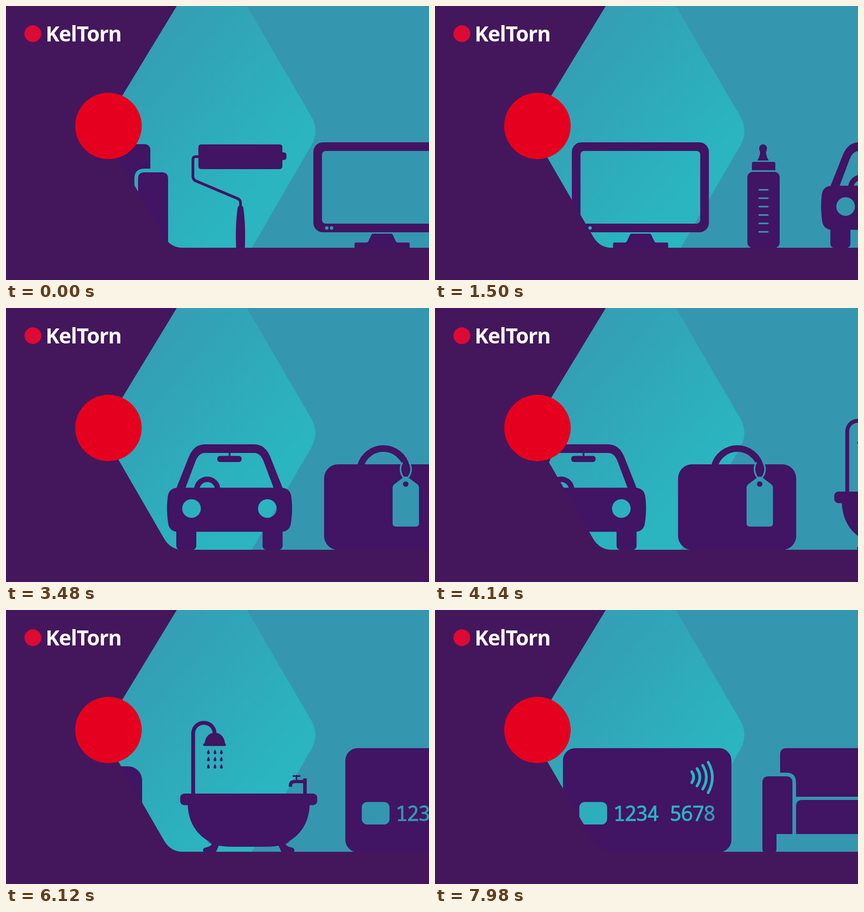
Write an HTML page that moves like this. It is 929x603 px and loops after 8000 ms.

```html
<!DOCTYPE html>
<html lang="en">
<head>
<meta charset="utf-8">
<title>KelTorn</title>
<style>
  html, body { margin: 0; width: 100%; height: 100%; overflow: hidden; background: #44175c; }
  svg { display: block; width: 929px; height: 603px; }
  #shapes { fill: #fff; }
  .cut { fill: #000; }
  .rod { fill: none; stroke: #fff; }
  .slit { fill: none; stroke: #000; stroke-linecap: round; }
  .digits { font: 400 45px "Noto Sans Mono", monospace; letter-spacing: -2.2px; white-space: pre; stroke: #000; stroke-width: 0.9px; stroke-linejoin: round; }
  .brand { font: 700 46px "Open Sans", sans-serif; letter-spacing: -1.2px; fill: #fff; }
</style>
</head>
<body>
<svg viewBox="0 0 929 603">
  <defs>
    <linearGradient id="glow" gradientUnits="userSpaceOnUse" x1="330" y1="90" x2="610" y2="330">
      <stop offset="0" stop-color="#349fb5"/>
      <stop offset="1" stop-color="#2ab5c0"/>
    </linearGradient>

    <path id="drop" d="M0 -5.5C1 -3 3 -1 3 2A3 3 0 0 1 -3 2C-3 -1 -1 -3 0 -5.5Z"/>
    <g id="drops">
      <use href="#drop" x="444.5"/><use href="#drop" x="459"/><use href="#drop" x="473"/>
    </g>
    <path id="foot" d="M441 509L468 517Q464 526 461 533H434Q430 526 437 523Q449 521 452 515Z"/>

    <g id="sofaHalf">
      <path d="M39 411V318Q39 304 53 304H250V411Z"/>
      <path d="M74 493V432Q74 418 88 418H250V493Z"/>
      <path class="cut" d="M0 358H52Q74 358 74 380V538H0Z"/>
      <path d="M0 380Q0 366 14 366H52Q66 366 66 380V493H31V526Q31 534 23 534H8Q0 534 0 526Z"/>
    </g>

    <mask id="shapes" maskUnits="userSpaceOnUse" x="-100" y="0" width="3100" height="603">
      <use href="#sofaHalf" transform="translate(356) scale(-1 1)"/>

      <g id="roller">
        <rect x="422.5" y="304.5" width="184.5" height="54.5" rx="6"/>
        <rect x="600" y="322" width="16" height="17" rx="6"/>
        <path class="rod" stroke-width="6" d="M424 331.5H417Q410.500 331.500 410.500 338V375Q410.500 382 417 385L508 423.500Q515 426.500 515 433V442"/>
        <path d="M508.500 446Q509 439 515 439Q521 439 521.500 446C525 470 526 505 524.500 533H505.500C504 505 505 470 508.500 446Z"/>
      </g>

      <g id="monitor" transform="translate(374.5)">
        <rect x="300.5" y="300" width="301" height="198" rx="21"/>
        <rect class="cut" x="319.500" y="319" width="263" height="160" rx="8"/>
        <circle class="cut" cx="330" cy="488.5" r="3.8"/>
        <circle class="cut" cx="340.5" cy="488.5" r="3.8"/>
        <path d="M391 533V523.500Q391 520.500 394 520.500H417Q420 520.500 421.500 517.500L428 503.500Q429 501 432 501H471Q474 501 475 503.500L481.500 517.500Q483 520.500 486 520.500H509Q512 520.500 512 523.500V533Z"/>
      </g>

      <g id="bottle" transform="translate(374.5)">
        <path d="M708 340C713 332 714 325 714 321Q712 317 712 313A8.500 8.500 0 0 1 729 313Q729 317 727 321C727 325 728 332 733 340Z"/>
        <path d="M696 361.500V347Q696 343 700 343H743.500Q747.500 343 747.500 347V361.500Z"/>
        <rect x="686" y="365" width="71" height="167.500" rx="12"/>
        <path class="slit" stroke-width="3.4" d="M712 404.500h19m-19 18.500h19m-19 18.500h19m-19 18.500h19m-19 18.500h19m-19 18.500h19"/>
      </g>

      <g id="car" transform="translate(868.8)">
        <path d="M374 397L401 329C408 312 418 300 438 300H544C564 300 574 312 581 329L608 397Z"/>
        <path class="cut" d="M393.500 398L416 338Q423 319 437 319H545Q559 319 566 338L588.500 398Z"/>
        <circle cx="442" cy="400" r="29"/>
        <circle class="cut" cx="442" cy="400" r="17"/>
        <rect x="489" y="317" width="4" height="10"/>
        <rect x="464" y="325.500" width="53.500" height="13.500" rx="6"/>
        <path d="M378 395.500H604C620 396 626 405 627 418C629 435 629 452 626 472C625 485 617 492.500 604 492.500H378C365 492.500 357 485 356 472C353 452 353 435 355 418C356 405 362 396 378 395.500Z"/>
        <rect x="374" y="480" width="44" height="52.500" rx="9"/>
        <rect x="563.500" y="480" width="44" height="52.500" rx="9"/>
        <circle class="cut" cx="407.500" cy="441.300" r="20.500"/>
        <circle class="cut" cx="574" cy="441.300" r="20.500"/>
      </g>

      <g id="suitcase" transform="translate(1213.4)">
        <rect x="354" y="344" width="259.500" height="188.500" rx="31"/>
        <path class="rod" stroke-width="14.500" d="M433.500 350A52 52 0 0 1 535 350"/>
        <path class="slit" stroke-width="3.500" d="M531 375C520 366 520 350 525.500 341M536 375C547 366 547 350 541.500 341"/>
        <path class="cut" d="M528 373Q533.500 369 539 373L559 388Q562.500 391 562.500 396V474Q562.500 481 555.500 481H511.500Q504.500 481 504.500 474V396Q504.500 391 508 388Z"/>
        <circle cx="533.300" cy="387.500" r="6"/>
      </g>

      <g id="bath" transform="translate(1528)">
        <path class="rod" stroke-width="8.500" d="M411 406V271.700A23.500 23.500 0 0 1 458 271.700"/>
        <path d="M436 295C437 279 447 270 458.500 270C470 270 480 279 481 295Z"/>
        <rect x="433" y="293.500" width="50" height="5.700" rx="2.800"/>
        <use href="#drops" y="312.500"/><use href="#drops" y="328"/><use href="#drops" y="344"/>
        <rect x="382.500" y="404" width="301" height="25.500" rx="9"/>
        <path d="M399 427C400 466 418 500 462 517Q475 521 495 521H572Q592 521 605 517C648 500 666 466 667 427Z"/>
        <use href="#foot"/>
        <use href="#foot" transform="translate(1066) scale(-1 1)"/>
        <rect x="652.500" y="370.500" width="8" height="36" rx="1"/>
        <path class="rod" stroke-width="7" d="M624.500 389V387Q624.500 377.500 634 377.500H654"/>
        <path class="rod" stroke-width="3" d="M632 365.500H644M638 365.500V376"/>
        <circle cx="631.500" cy="365.500" r="2.300"/><circle cx="638" cy="365.500" r="2.800"/><circle cx="644.500" cy="365.500" r="2.300"/>
      </g>

      <g id="card" transform="translate(1992.3)">
        <rect x="281" y="304" width="370" height="229" rx="27"/>
        <rect class="cut" x="317" y="422.500" width="61" height="49.500" rx="12"/>
        <text class="cut digits" x="391.200" y="463.500">1234 5678</text>
        <path class="slit" stroke-width="6" d="M564 356Q572 368 564 380M575.500 349Q588 368 575.500 387M588 342Q604 368 588 394M600 335Q618.500 368 600 402"/>
      </g>

      <use href="#sofaHalf" x="2711.300"/>
    </mask>
  </defs>

  <rect width="929" height="603" fill="#3596b0"/>
  <path fill="url(#glow)" d="M200 0H529L671 244Q688 275 671 306L540 532H200Z"/>

  <g id="world">
    <rect x="-100" width="3100" height="603" fill="#411464" mask="url(#shapes)"/>
  </g>

  <path fill="#44175c" d="M0 0H375L255 198L213 266V275L347.500 508Q362 532 388 532H929V603H0Z"/>
  <circle cx="225" cy="264" r="73" fill="#e6001f"/>

  <circle cx="59" cy="61" r="18.500" fill="#dc0a35"/>
  <text class="brand" x="87" y="77.500">KelTorn</text>
</svg>
<script>
  const LOOP = 8000, STEP_MS = 60, STEP_PX = 14.98;
  const world = document.getElementById('world');

  function draw() {
    const step = Math.floor(performance.now() % LOOP / STEP_MS);
    world.setAttribute('transform', `translate(${-step * STEP_PX})`);
    requestAnimationFrame(draw);
  }
  draw();
</script>
</body>
</html>
```
